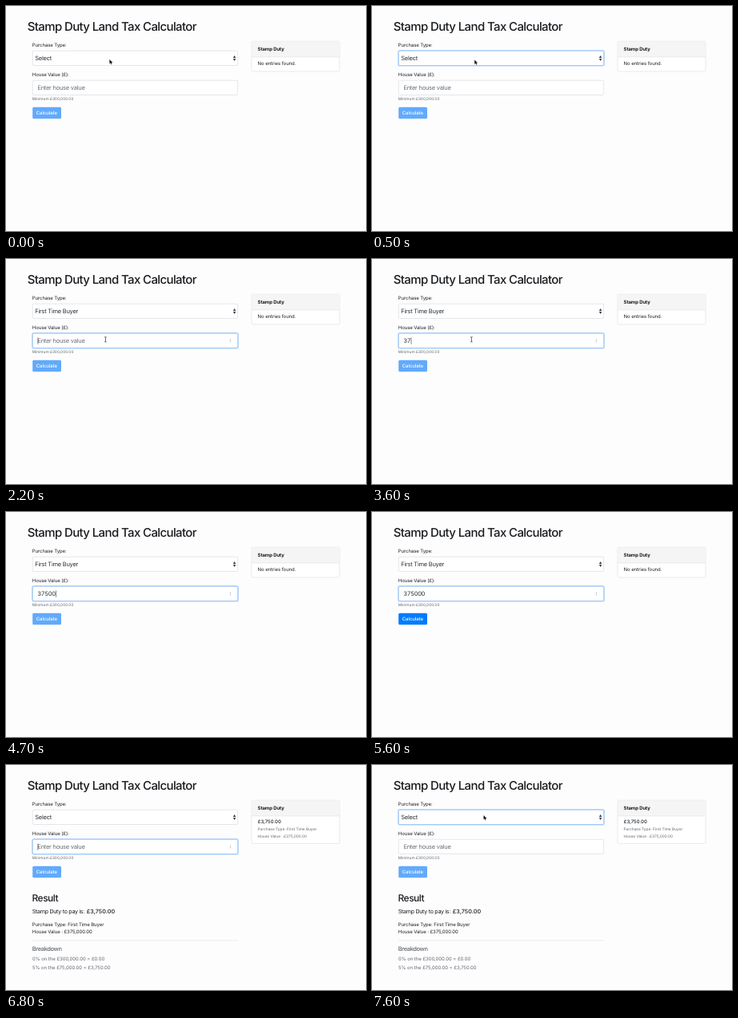
Write an HTML page that moves like this. It is 450 by 282 pixels and loops after 8000 ms.

```html
<!DOCTYPE html>
<html lang="en">
<head>
<meta charset="utf-8">
<title>Stamp Duty Land Tax Calculator</title>
<style>
  html, body { margin: 0; width: 100%; height: 100%; overflow: hidden; background: #fefdfe; }
  svg { display: block; width: 450px; height: 282px; }
  text {
    font-family: Inter, Roboto, sans-serif;
    font-size: 6px;
    letter-spacing: -.08px;
    font-optical-sizing: none;
    text-rendering: geometricPrecision;
    white-space: pre;
    fill: #191c1f;
  }
  .title { font-size: 15px; font-weight: 550; letter-spacing: -.62px; }
  .head { font-size: 12px; font-weight: 500; letter-spacing: -.5px; }
  .field { font-size: 7.48px; letter-spacing: -.24px; fill: #42484e; }
  .dark { fill: #2b2f33; }
  .hint { fill: #666e76; }
  .digits { letter-spacing: -.38px; font-variant-numeric: tabular-nums; }
  .lead { font-size: 7.1px; letter-spacing: -.29px; }
  .sum { font-size: 7.2px; font-weight: 500; letter-spacing: .04px; }
  .small { font-size: 4.8px; letter-spacing: .01px; }
  .muted { fill: #5f676f; }
  .sub { font-size: 7.48px; font-weight: 500; letter-spacing: -.35px; }
  .calc { letter-spacing: -.04px; }
  .bold { font-weight: 700; letter-spacing: -.12px; }
  .medium { font-weight: 500; letter-spacing: 0; }
  .btn { font-weight: 550; fill: #fff; letter-spacing: -.08px; }
  .box { fill: #fff; stroke: #ced4da; stroke-width: .55; }
  .ring { fill: none; stroke: #007bff; stroke-opacity: .24; stroke-width: 1.2; }
  .edge { fill: none; stroke: #80bdff; stroke-width: .5; }
</style>
</head>
<body>
<svg viewBox="0 0 450 282">
  <defs>
    <g id="control">
      <rect class="ring" x="32.6" y="-.4" width="257.8" height="19.5" rx="2"/>
      <rect class="edge" x="33.3" y=".2" width="256.4" height="18.3" rx="1.6"/>
    </g>
  </defs>
  <rect width="450" height="282" fill="#fefdfe"/>
  <text class="title" x="26.7" y="30.9">Stamp Duty Land Tax Calculator</text>

  <text x="32.8" y="50.7">Purchase Type:</text>
  <rect class="box" x="33.3" y="56.2" width="256.4" height="18.3" rx="1.6"/>
  <use id="selFocus" href="#control" y="56"/>
  <text id="choice" class="field dark" x="36.3" y="68.1"></text>
  <path d="M283.9 64.9l1.7-2.8 1.7 2.8zM283.9 66.1l1.7 2.8 1.7-2.8z" fill="#343a40"/>

  <text x="32.8" y="87.7">House Value (£):</text>
  <rect class="box" x="33.3" y="93.2" width="256.4" height="18.3" rx="1.6"/>
  <use id="inFocus" href="#control" y="93"/>
  <text id="hint" class="field hint" x="39.4" y="105.2">Enter house value</text>
  <text id="value" class="field dark digits" x="39.3" y="105.2"></text>
  <rect id="caret" y="98.4" width=".6" height="8.4" fill="#33383d"/>
  <path id="spin" d="M279.5 101.7l1-1.3 1 1.3zM279.5 103.3l1 1.3 1-1.3z" fill="#a4a4a4"/>
  <text class="small muted" x="32.8" y="118.2">Minimum £300,000.00</text>

  <rect id="button" x="33.2" y="126.8" width="35.8" height="14.5" rx="1.5"/>
  <text class="btn" x="37.8" y="136">Calculate</text>

  <rect id="card" x="307" y="44.2" width="110" rx="1.5" fill="#fff" stroke="#dcdcdd" stroke-width=".6"/>
  <path d="M307.3 63.8V45.7q0-1.2 1.2-1.2h107q1.2 0 1.2 1.2v18.1z" fill="#f6f5f6"/>
  <path d="M307 63.8h110" stroke="#dcdcdd" stroke-width=".6"/>
  <text class="bold" x="314.6" y="56">Stamp Duty</text>
  <text id="empty" x="314.6" y="74.4">No entries found.</text>

  <g id="entry">
    <text class="medium" x="314.7" y="73.4">£3,750.00</text>
    <text class="small muted" x="314.4" y="81.9">Purchase Type: First Time Buyer</text>
    <text class="small muted" x="314.4" y="91">House Value : £375,000.00</text>
  </g>
  <g id="result">
    <text class="head" x="32.5" y="171.4">Result</text>
    <text class="lead" x="32.7" y="185.5">Stamp Duty to pay is:</text>
    <text class="sum" x="100.8" y="185.5">£3,750.00</text>
    <text x="32.8" y="201.8">Purchase Type: First Time Buyer</text>
    <text x="32.8" y="211.1">House Value : £375,000.00</text>
    <path d="M33 220h257" stroke="#e3e3e4" stroke-width=".7"/>
    <text class="sub muted" x="32.7" y="233.4">Breakdown</text>
    <text class="calc muted" x="32.9" y="245.2">0% on the £300,000.00 = £0.00</text>
    <text class="calc muted" x="32.9" y="256.1">5% on the £75,000.00 = £3,750.00</text>
  </g>

  <path id="arrow" d="M0 0V5.5L1.3 4.3 2.1 6.3 3 5.9 2.2 4H3.9Z" fill="#111" stroke="#fff" stroke-width=".5" paint-order="stroke"/>
  <path id="beam" d="M-1.2-3.2Q0-3.2 0-2.4 0-3.2 1.2-3.2M0-2.4V2.4M-1.2 3.2Q0 3.2 0 2.4 0 3.2 1.2 3.2" fill="none" stroke="#222" stroke-width=".7"/>
</svg>
<script>
const LOOP = 8000, TICK = 100;
const SUBMIT = 5700;
const DIGITS = "375000";
const KEYS = [3000, 3600, 4200, 4500, 4700, 5100];
const CARET = [[2000, 2500], [3000, 3500], [3600, 5600], [5700, 6200], [6800, 7300]];

// Pointer stops: time, shape, x, y
const POINTER = [
  [0, "arrow", 129.4, 67],
  [200, "arrow", 128.2, 67.4],
  [1500, "arrow", 127.4, 72],
  [1600, "arrow", 126, 83],
  [1700, "beam", 124.8, 97],
  [1800, "beam", 124.4, 100.8],
  [4500, "none", 0, 0],
  [7000, "beam", 128, 100],
  [7100, "arrow", 140, 86],
  [7200, "arrow", 146, 70],
  [7300, "arrow", 139.5, 63]
];

const el = {};
document.querySelectorAll("[id]").forEach(e => el[e.id] = e);

const within = (t, a, b) => t >= a && t < b;
const fade = (t, at) => t < at ? 0 : Math.min(1, (t - at) / 200 + .5);
const show = (e, on) => e.setAttribute("visibility", on ? "visible" : "hidden");
const set = (e, text) => { if (e.textContent !== text) e.textContent = text; };

function movePointer(t) {
  const [, shape, x, y] = POINTER.filter(p => p[0] <= t).pop();
  for (const name of ["arrow", "beam"]) {
    show(el[name], name === shape);
    el[name].setAttribute("transform", `translate(${x} ${y})`);
  }
}

function draw(time) {
  const t = Math.floor(time / TICK) * TICK;
  const done = t >= SUBMIT;
  const typed = done ? 0 : KEYS.filter(k => k <= t).length;

  el.selFocus.setAttribute("opacity", fade(t, 400) - fade(t, 2100) + fade(t, 7500));
  el.inFocus.setAttribute("opacity", fade(t, 2100) - fade(t, 7500));

  set(el.choice, within(t, 1500, SUBMIT) ? "First Time Buyer" : "Select");
  set(el.value, DIGITS.slice(0, typed));
  show(el.hint, !typed);
  show(el.spin, within(t, 1700, 7500));
  show(el.caret, CARET.some(([a, b]) => within(t, a, b)));
  el.caret.setAttribute("x", 39.6 + typed * 4.55);

  el.button.setAttribute("fill", typed === DIGITS.length ? "#007bff" : "#62aafc");
  el.card.setAttribute("height", done ? 54.2 : 37.8);
  show(el.empty, !done);
  show(el.entry, done);
  show(el.result, done);
  movePointer(t);
}

function frame() {
  draw(performance.now() % LOOP);
  requestAnimationFrame(frame);
}
frame();
</script>
</body>
</html>
```
